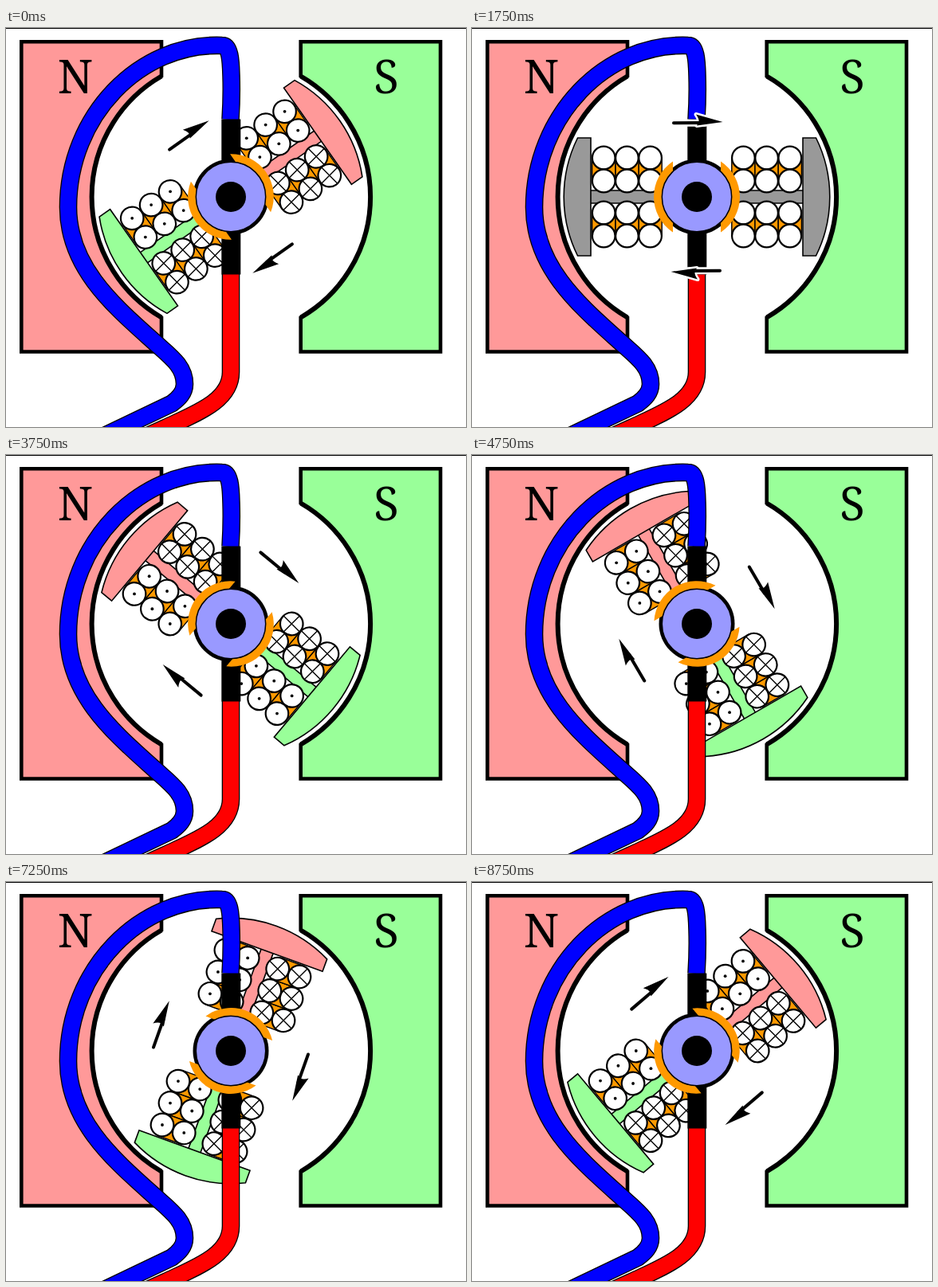
An HTML page for the animation above (9000 ms loop, 577 px wide and 501 px high).

```html
<!DOCTYPE html>
<html lang="en">
<head>
<meta charset="utf-8">
<title>Electric motor</title>
<style>
  html, body { margin: 0; width: 100%; height: 100%; overflow: hidden; background: #fff; }
  svg { display: block; width: 577px; height: 501px; }
  text { font: 58px "Noto Serif", serif; text-anchor: middle; }
  .magnet { stroke: #000; stroke-width: 4.6; }
  .gap { fill: none; stroke: #000; stroke-width: 6; }
  .wire { fill: none; stroke-width: 20; }
  .wire.edge { stroke: #000; stroke-width: 22.6; }
  .iron { stroke: #000; stroke-width: 1.6; }
  .turn { fill: #fff; stroke: #000; stroke-width: 2.2; }
  .bar { fill: #f90; stroke: #000; stroke-width: 1.4; }
  .cross { fill: none; stroke: #000; stroke-width: 1.4; }
  .shaft { fill: none; stroke: #000; stroke-width: 4; stroke-linecap: round; }
  .halo { fill: #fff; stroke: #fff; stroke-width: 9; stroke-linecap: round; stroke-linejoin: round; }
  .halo.tip { stroke-width: 5; }
</style>
</head>
<body>
<svg viewBox="0 0 577 501">
  <defs>
    <path id="segment" d="M30 -44.5A53.3 53.3 0 0 1 30 44.5V32A44 44 0 0 0 30 -32Z" fill="#f90"/>
    <path id="head" d="M32.5 -94L-1 -103.5Q3 -98 2.5 -94L0 -89.5Z"/>
    <g id="arrow">
      <path class="halo" d="M-29 -92.7H10"/>
      <use class="halo tip" href="#head"/>
      <path class="shaft" d="M-29 -92.7L10 -93"/>
      <use href="#head"/>
    </g>
  </defs>

  <path class="magnet" fill="#f99" d="M195 60.5V17.3H19.300V406.5H195V363.5A175 175 0 0 1 195 60.5Z"/>
  <path class="magnet" fill="#9f9" d="M369.7 60.5V17.3H545V406.5H369.7V363.5A175 175 0 0 0 369.7 60.5Z"/>
  <path class="gap" d="M195 60.5A175 175 0 0 0 195 363.5M369.7 60.5A175 175 0 0 1 369.7 363.5"/>
  <text x="87" y="82">N</text>
  <text x="477" y="82">S</text>

  <g transform="translate(282 212)"><g id="rotor" class="spin"></g></g>

  <g id="wires"></g>
  <path d="M270.3 114.5h24v55h-24zM270.3 255h24v54.5h-24z"/>

  <g transform="translate(282 212)">
    <circle r="47.5"/>
    <g class="spin">
      <use href="#segment"/>
      <use href="#segment" transform="rotate(180)"/>
    </g>
    <circle r="43.7" fill="#99f" stroke="#000" stroke-width="1.5"/>
    <circle r="19"/>
    <g class="spin">
      <use href="#arrow"/>
      <use href="#arrow" transform="rotate(180)"/>
    </g>
  </g>
  <path d="M0 0H577V1H0Z"/>
</svg>
<script>
const $ = s => document.querySelector(s), all = s => document.querySelectorAll(s);

const wire = (colour, d) =>
  `<path class="wire edge" d="${d}"/><path class="wire" stroke="${colour}" d="${d}"/>`;

$('#wires').innerHTML =
  wire('#f00', 'M282 309V432C282 468 240 483 200 502L180 511') +
  wire('#00f', 'M281.5 115C283 92 283 75 282.5 60C282 40 281 22 271 22C168 18 78 110 78 225' +
    'C78 302 138 351 188 396C207 413 224 425 224 447C224 458 217 465 208 471.5L115 516');

// One half of the armature; side is -1 (left) or 1 (right).
function pole(side) {
  const cols = [58.4, 87.6, 116.8].map(x => x * side);
  const bars = cols.flatMap(x => [-49, 20].map(y =>
    `<rect class="bar" x="${x - 14.6}" y="${y}" width="29.2" height="29"/>`));
  const turns = cols.flatMap(x => [-49, -20, 20, 49].map(y =>
    `<g transform="translate(${x} ${y})"><circle class="turn" r="14.3"/><g class="mark">` +
    (y < 0 ? '<path class="cross" d="M-9.8 -9.8L9.8 9.8M-9.8 9.8L9.8 -9.8"/>' : '<circle r="1.9"/>') +
    '</g></g>'));
  return `<g class="iron" transform="scale(${side} 1)"><path d="M40 -8H135V8H40Z"/>
    <path d="M133 -74H149.5A167 167 0 0 1 149.5 74H133Z"/></g>` +
    bars.join('') + turns.join('');
}

$('#rotor').innerHTML = pole(-1) + pole(1);
const irons = all('.iron'), marks = all('.mark'), spinners = all('.spin');

function pose(angle) {
  // The brushes touch no segment while the armature is near horizontal.
  const live = angle > 22 && angle < 158;
  spinners.forEach(g => g.setAttribute('transform', `rotate(${angle})`));
  irons.forEach((p, i) => p.setAttribute('fill', live ? ['#f99', '#9f9'][i] : '#999'));
  marks.forEach(m => {
    m.setAttribute('transform', `rotate(${-angle})`);
    m.setAttribute('display', live ? 'inline' : 'none');
  });
}

const start = performance.now();
function tick() {
  const step = Math.floor((performance.now() - start) % 9000 / 250);
  pose((145 + step * 5) % 180);
  requestAnimationFrame(tick);
}
tick();
</script>
</body>
</html>
```
